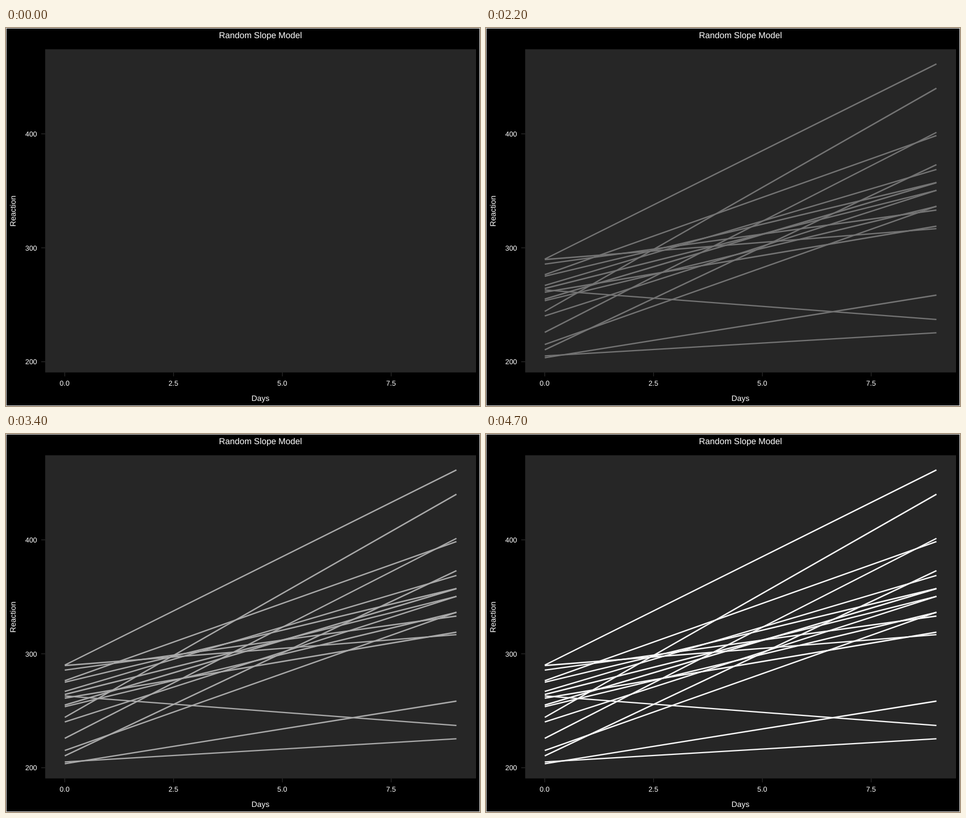
These frames come from a looping animation (837 px wide and 669 px high, 8000 ms). An HTML page with a canvas:

```html
<!DOCTYPE html>
<html lang="en">
<head>
<meta charset="utf-8">
<title>Random Slope Model</title>
<style>
  html, body { margin: 0; width: 837px; height: 669px; overflow: hidden; background: #000; }
  canvas, svg { position: absolute; left: 0; top: 0; }
  text {
    font-family: "Liberation Sans", Arial, Helvetica, sans-serif;
    text-rendering: geometricPrecision;
    text-anchor: middle;
    fill: #fff;
  }
  .title { font-size: 15.28px; }
  .axis { font-size: 13.89px; }
  .tick { font-size: 12.5px; }
  .y { text-anchor: end; }
</style>
</head>
<body>
<canvas id="plot" width="837" height="669"></canvas>
<svg id="labels" width="837" height="669">
  <text class="title" x="449.3" y="18.3">Random Slope Model</text>
  <text class="axis" x="449.3" y="660">Days</text>
  <text class="axis" transform="translate(17 324) rotate(-90)">Reaction</text>
</svg>
<script>
const W = 837, H = 669, LOOP = 8000, DAYS = 9;
const panel = { x: 69.2, y: 37.6, w: 760.8, h: 572 };

// Intercept and slope of each fitted line
const fits = [
  [244.2, 21.76], [205.1, 2.26], [203.5, 6.11], [289.7, 3.01], [285.7, 5.27], [264.3, 9.57],
  [275, 9.14], [240.2, 12.25], [263, -2.88], [290.1, 19.03], [215.1, 13.49], [225.8, 19.5],
  [261.1, 6.43], [276.4, 13.57], [255, 11.35], [210.4, 18.06], [253.6, 9.19], [267, 11.3]
];

// Axes run 5% past the data on both sides
const scale = (lo, hi) => v => ((v - lo) / (hi - lo) + 0.05) / 1.1;
const ends = fits.flatMap(([a, b]) => [a, a + DAYS * b]);
const unitX = scale(0, DAYS);
const unitY = scale(Math.min(...ends), Math.max(...ends));
const px = day => panel.x + unitX(day) * panel.w;
const py = value => panel.y + (1 - unitY(value)) * panel.h;

const ctx = document.getElementById("plot").getContext("2d");
const labels = document.getElementById("labels");
const xTicks = [0, 2.5, 5, 7.5], yTicks = [200, 300, 400];

function addLabel(str, x, y, cls) {
  const el = document.createElementNS("http://www.w3.org/2000/svg", "text");
  el.setAttribute("class", cls);
  el.setAttribute("x", x);
  el.setAttribute("y", y);
  el.textContent = str;
  labels.append(el);
}

xTicks.forEach(d => addLabel(d.toFixed(1), px(d) - 0.3, 633.3, "tick"));
yTicks.forEach(v => addLabel(v, 54.8, py(v) + 4.5, "tick y"));

function line(x1, y1, x2, y2) {
  ctx.beginPath();
  ctx.moveTo(x1, y1);
  ctx.lineTo(x2, y2);
  ctx.stroke();
}

function drawFrame() {
  ctx.fillStyle = "#000";
  ctx.fillRect(0, 0, W, H);
  ctx.lineWidth = 1;
  ctx.strokeStyle = "#e6e6e6";
  ctx.strokeRect(0.5, 0.5, W - 1, H - 1);
  ctx.fillStyle = "#262626";
  ctx.fillRect(panel.x, panel.y, panel.w, panel.h);
  ctx.lineWidth = 1.1;
  ctx.strokeStyle = "#333";
  const bottom = panel.y + panel.h;
  xTicks.forEach(d => line(px(d), bottom, px(d), bottom + 7));
  yTicks.forEach(v => line(panel.x - 7, py(v), panel.x, py(v)));
}

function drawFits(grey) {
  ctx.lineWidth = 2.4;
  ctx.strokeStyle = `rgb(${grey},${grey},${grey})`;
  fits.forEach(([a, b]) => line(px(0), py(a), px(DAYS), py(a + DAYS * b)));
}

// Fade in twelve hard steps: the first is long, the rest even
function fadeStep(t) {
  if (t < 600) return 0;
  return Math.min(12, Math.max(1, 2 + Math.floor((t - 1100) / 360)));
}

function render(now) {
  const u = fadeStep(now % LOOP) / 12;
  drawFrame();
  if (u) drawFits(Math.round(38 + 212 * u * (0.8 + 0.2 * u)));
}

function tick() {
  render(performance.now());
  requestAnimationFrame(tick);
}
tick();
</script>
</body>
</html>
```
